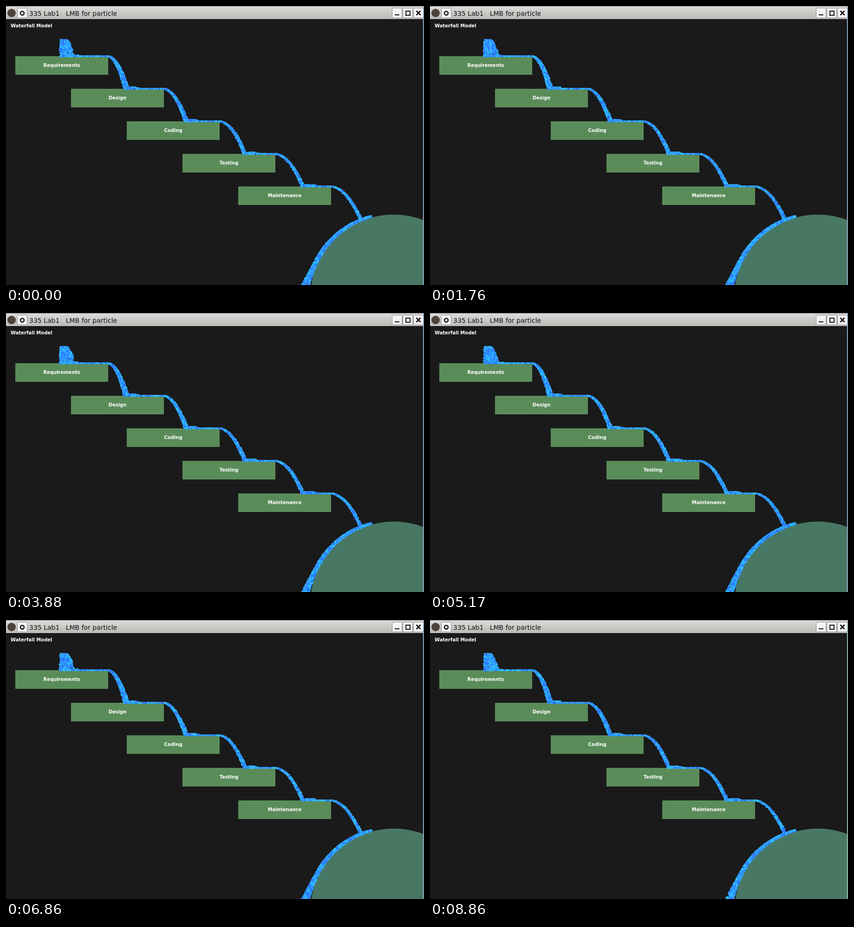
Recreate the animation shown at these times as an HTML page with a canvas. Size 900 by 600 pixels, loop 8.96 s.

```html
<!DOCTYPE html>
<html lang="en">
<head>
<meta charset="utf-8">
<title>Waterfall Model</title>
<style>
  html, body { margin: 0; width: 900px; height: 600px; overflow: hidden; background: #1a1a1a; }
  canvas { display: block; }
</style>
</head>
<body>
<canvas id="stage" width="900" height="600"></canvas>
<script>
const ctx = document.getElementById('stage').getContext('2d');
const LOOP = 8960, FRAME = 40, STEPS = 2;      // simulation steps per frame
const TRACKS = 2016, PERIOD = 112;             // each track emits once per PERIOD steps
const GRAVITY = 0.1;
const BALL = { x: 835, y: 628.5, r: 180 };
const LABELS = ['Requirements', 'Design', 'Coding', 'Testing', 'Maintenance'];
const SPEED = [1.08, 1.33, 1.5, 1.63, 1.75];
const SPREAD = [0.14, 0.1, 0.085, 0.075, 0.065];

let seed = 335;
function rnd() {
  seed = (seed + 0x6D2B79F5) | 0;
  let h = Math.imul(seed ^ (seed >>> 15), 1 | seed);
  h ^= h + Math.imul(h ^ (h >>> 7), 61 | h);
  return ((h ^ (h >>> 14)) >>> 0) / 4294967296;
}

// Random value in -1..1 that favours both ends, so streams get full edges
const edgy = () => Math.sin(Math.PI * (rnd() - 0.5));

const COLORS = Array.from({ length: 32 }, (_, i) => `rgb(${40 + i % 4 * 4},${108 + i * 3},255)`);

// Positions of one drop, step by step, from the spout to the bottom edge
function makeTrack() {
  const path = [];
  const add = (x, y) => path.push(Math.round(x - 2), Math.round(y - 2));
  const side = rnd();
  let x = 118 + 11.5 * side, y = 73, vx = -0.1 + 0.83 * side, vy = 0, box = -1;

  while (Math.hypot(x - BALL.x, y - BALL.y) > BALL.r + 1.5) {
    add(x, y);
    vy += GRAVITY;
    x += vx;
    y += vy;
    for (let k = 0; k < 5; k++) {
      const left = 20 + 120 * k, floor = 108 + 70 * k;
      if (x < left || x > left + 200 || y < floor || y > floor + 20) continue;
      y = floor;
      vy = vy > 1.2 ? -vy * 0.24 * Math.sqrt(rnd()) : 0;
      if (box !== k) {
        box = k;
        vx = SPEED[k] + SPREAD[k] * edgy();
      }
    }
  }

  // Roll along the ball; angle in degrees from its top
  const start = Math.atan2(BALL.x - x, BALL.y - y) * 180 / Math.PI;
  const push = 0.37 * rnd(), depth = (1 + edgy()) / 2;
  for (let t = 0; y < 604; t++) {
    const angle = start - push * t + 0.005 * t * t;
    const lift = Math.max(0, angle - 63) ** 2;
    const thick = 6 + 0.09 * (angle - 23) + 0.029 * lift;
    const low = 1.5 + 0.008 * lift;
    const r = BALL.r + low + depth * (thick - 2 - low);
    const a = angle * Math.PI / 180;
    x = BALL.x - r * Math.sin(a);
    y = BALL.y - r * Math.cos(a);
    add(x, y);
  }
  return path;
}

const tracks = Array.from({ length: TRACKS }, makeTrack);
const tints = Array.from({ length: TRACKS * 4 }, () => COLORS[rnd() * 32 | 0]);

function rect(color, x, y, w, h) {
  ctx.fillStyle = color;
  ctx.fillRect(x, y, w, h);
}

function disc(color, x, y, r) {
  ctx.fillStyle = color;
  ctx.beginPath();
  ctx.arc(x, y, r, 0, 7);
  ctx.fill();
}

function text(str, x, y, font, color, align = 'left') {
  ctx.font = font;
  ctx.fillStyle = color;
  ctx.textAlign = align;
  ctx.fillText(str, x, y);
}

function button(x, w) {
  ctx.fillStyle = '#f4f4f2';
  ctx.strokeStyle = '#8c8a88';
  ctx.lineWidth = 1;
  ctx.beginPath();
  ctx.roundRect(x + 0.5, 4.5, w, 21, 2);
  ctx.fill();
  ctx.stroke();
}

function drawTitleBar() {
  const bar = ctx.createLinearGradient(0, 0, 0, 27);
  bar.addColorStop(0, '#dedcda');
  bar.addColorStop(1, '#bcbab7');
  rect(bar, 0, 0, 899, 27);
  rect('#6b6966', 0, 0, 899, 1);
  rect('#d6d4d1', 0, 27, 899, 1);
  disc('#4d4338', 12, 15, 9);
  button(24, 21);
  ctx.strokeStyle = '#111';
  ctx.lineWidth = 2.5;
  ctx.beginPath();
  ctx.arc(35, 15.5, 4, 0, 7);
  ctx.stroke();
  text('335 Lab1   LMB for particle', 50, 21, '14px "DejaVu Sans", sans-serif', '#111');

  [831, 854, 877].forEach(x => button(x, 21));
  rect('#111', 837, 18, 10, 2);
  ctx.strokeStyle = '#111';
  ctx.lineWidth = 2;
  ctx.strokeRect(861, 11, 9, 9);
  ctx.lineWidth = 2.6;
  ctx.beginPath();
  ctx.moveTo(883.5, 10.5); ctx.lineTo(892.5, 19.5);
  ctx.moveTo(892.5, 10.5); ctx.lineTo(883.5, 19.5);
  ctx.stroke();
}

function drawWater(step) {
  tracks.forEach((path, i) => {
    const clock = step + i % PERIOD;
    const birth = Math.floor(clock / PERIOD);
    for (let age = clock % PERIOD, n = 0; age * 2 < path.length; age += PERIOD, n++) {
      rect(tints[i * 4 + (birth - n + 400) % 4], path[age * 2], path[age * 2 + 1], 4, 4);
    }
  });
}

let shown = -1;
function draw(now) {
  requestAnimationFrame(() => draw(performance.now()));
  const t = now % LOOP, frame = Math.floor(t / FRAME);
  if (frame === shown) return;
  shown = frame;

  const labelFont = 'bold 10px "DejaVu Sans", sans-serif';
  rect('#1a1a1a', 0, 0, 900, 600);
  disc('#487864', BALL.x, BALL.y, BALL.r);
  LABELS.forEach((_, k) => rect('#5a8c5a', 20 + 120 * k, 108 + 70 * k, 200, 40));
  drawWater(frame * STEPS);
  text('Waterfall Model', 10, 46, labelFont, '#fff');
  LABELS.forEach((s, k) => text(s, 120 + 120 * k, 131 + 70 * k, labelFont, '#fff', 'center'));
  drawTitleBar();
  // Window edge, then what lies behind the window
  rect('#d4d4d2', 898, 0, 1, 600);
  rect(t < 8600 ? '#2f5fb0' : '#3f8f78', 899, 0, 1, 600);
}
draw(performance.now());
</script>
</body>
</html>
```
